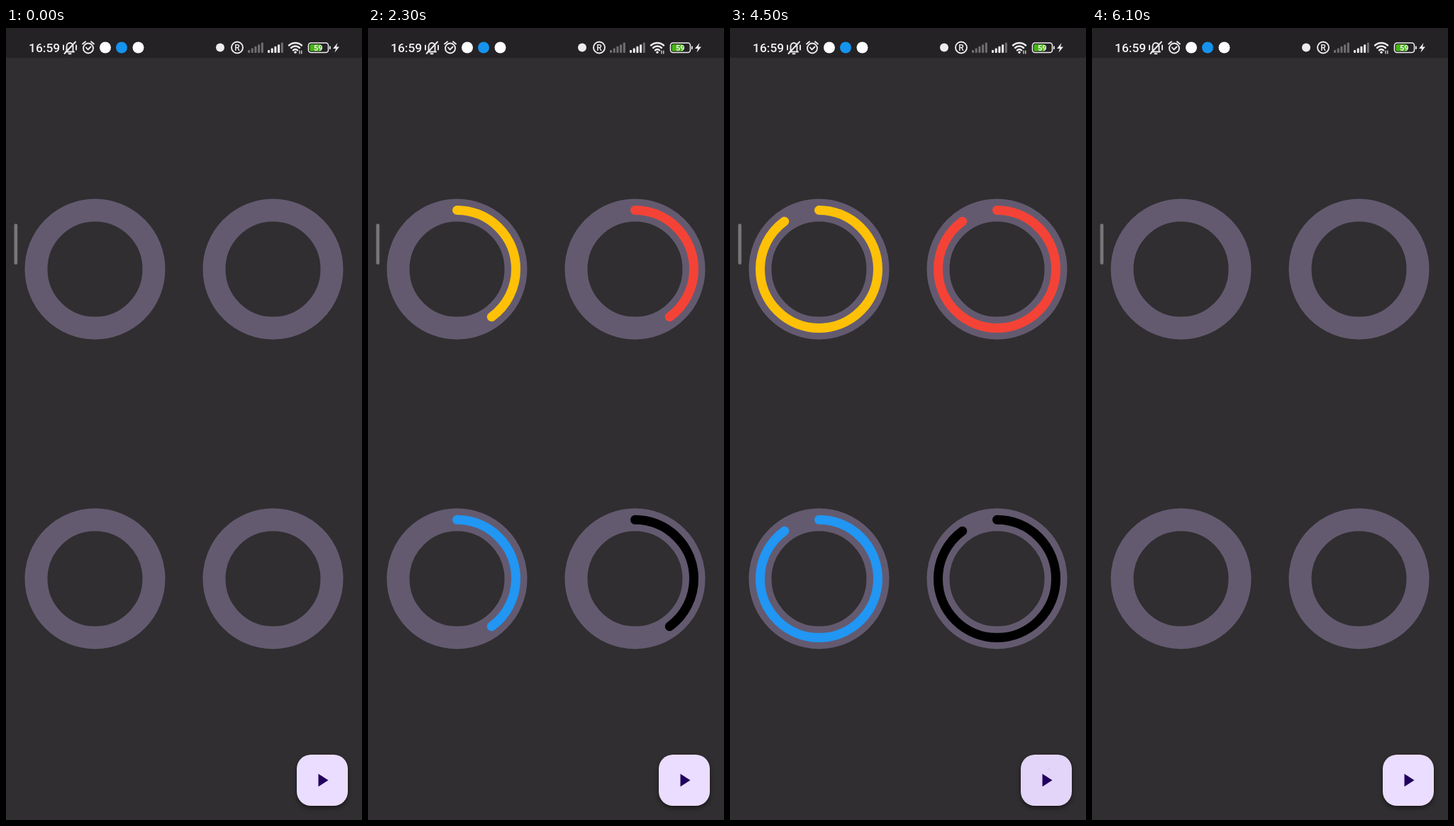
Write an HTML page that moves like this. It is 502 by 1115 pixels and loops after 6200 ms.

```html
<!DOCTYPE html>
<html lang="en">
<head>
<meta charset="utf-8">
<title>Progress rings</title>
<style>
  html, body { margin: 0; width: 100%; height: 100%; overflow: hidden; background: #302e30; }
  svg { display: block; width: 502px; height: 1115px; }
  text { font-family: Roboto, Inter, sans-serif; font-weight: 500; fill: #f3f2f3; }
  .line { fill: none; stroke: #eeedee; stroke-width: 1.9; stroke-linecap: round; stroke-linejoin: round; }
  .fab { filter: drop-shadow(0 3px 3px #0007); }
</style>
</head>
<body>
<svg viewBox="0 0 502 1115">
  <defs>
    <clipPath id="fabClip"><rect x="410" y="1023" width="72" height="72" rx="20"/></clipPath>
  </defs>
  <rect width="502" height="1115" fill="#302e30"/>
  <rect width="502" height="42" fill="#242225"/>

  <text x="32" y="34" font-size="17.4">16:59</text>
  <!-- muted bell -->
  <g class="line" stroke-width="1.6">
    <path d="M84 33.5H96M85.5 33V26a4.5 5 0 0 1 9 0V33M88.5 36.3h3M82.500 36L98 19.500M81 24.500v6M99 24.500v6"/>
  </g>
  <!-- alarm -->
  <g class="line">
    <circle cx="116" cy="28.500" r="7"/>
    <path d="M108 22.500l4-3.300M124 22.500l-4-3.300M113 27.500l2.500 3 4-4"/>
  </g>
  <circle cx="140" cy="27.500" r="8" fill="#fff"/>
  <circle cx="163" cy="27.500" r="8" fill="#1593ed"/>
  <circle cx="186.500" cy="27.500" r="8" fill="#fff"/>

  <circle cx="302" cy="27.500" r="6" fill="#eeedee"/>
  <circle class="line" cx="326" cy="27.500" r="8"/>
  <text x="326" y="31.900" font-size="12" text-anchor="middle">R</text>
  <g id="bars"></g>
  <!-- wifi -->
  <g class="line" style="stroke-width:2.500">
    <path d="M399 24.500a13 13 0 0 1 18 0M402 28a8.700 8.700 0 0 1 12 0M405 31.300a4.300 4.300 0 0 1 6 0"/>
  </g>
  <circle cx="408" cy="34.300" r="1.700" fill="#eeedee"/>
  <path class="line" style="stroke-width:1.200" d="M414 32v4M416.800 32v4"/>
  <!-- battery -->
  <rect class="line" style="stroke-width:1.600" x="426.500" y="21" width="28" height="13.500" rx="3.500"/>
  <rect x="428.500" y="23" width="15.500" height="9.500" rx="1.500" fill="#45b510"/>
  <rect x="456" y="25.500" width="1.800" height="4.500" rx=".8" fill="#eeedee"/>
  <text x="440.300" y="32" font-size="11" text-anchor="middle" style="font-weight:700">59</text>
  <path d="M467.500 21l-6.500 8h4l-1.500 5.500 6.500-8h-4z" fill="#eeedee"/>

  <rect x="11.500" y="275.500" width="4.700" height="57.500" rx="2.350" fill="#787678"/>
  <g id="rings" fill="none"></g>

  <rect class="fab" x="410" y="1023" width="72" height="72" rx="20" fill="#eaddff"/>
  <g id="ripples" clip-path="url(#fabClip)" fill="#21005d"></g>
  <path d="M440.500 1050v18l14-9z" fill="#21005d"/>
</svg>
<script>
const LOOP = 6200, STEP = 100, RESET = 5050;
const PRESS_DELAY = 90, FILL_TIME = 300;
const taps = [150, 600, 1050, 1750, 2300, 2890, 3315, 3687, 4090, 4492];
const clamp = v => Math.max(0, Math.min(1, v));

function add(parent, tag, attrs) {
  const el = document.createElementNS('http://www.w3.org/2000/svg', tag);
  for (const key in attrs) el.setAttribute(key, attrs[key]);
  return document.getElementById(parent).appendChild(el);
}

// Two signal meters: the first empty, the second with four bars lit
[[341, 0], [369, 4]].forEach(([x, lit]) => {
  for (let i = 0; i < 5; i++) {
    const height = 4 + i * 2.6;
    add('bars', 'rect', { x: x + i * 4.7, y: 35 - height, width: 3, height, rx: 1,
      fill: i < lit ? '#eeedee' : '#706e70' });
  }
});

const arcs = ['#ffc107', '#f44336', '#2196f3', '#000'].map((color, i) => {
  const cx = 125.5 + i % 2 * 251, cy = i < 2 ? 339.5 : 775.3;
  add('rings', 'circle', { cx, cy, r: 83, stroke: '#635a70', 'stroke-width': 32 });
  return add('rings', 'circle', { cx, cy, r: 83, stroke: color, 'stroke-width': 13,
    'stroke-linecap': 'round', pathLength: 100, transform: `rotate(-90 ${cx} ${cy})` });
});

const ripples = taps.map((_, i) =>
  add('ripples', 'circle', { cx: i === 7 ? 442.5 : 450, cy: 1043 }));

function draw(t) {
  const progress = t < RESET
    ? taps.reduce((sum, tap) => sum + 10 * clamp((t - tap - PRESS_DELAY) / FILL_TIME), 0)
    : 0;
  arcs.forEach(arc => {
    arc.setAttribute('stroke-dasharray', `${progress} 200`);
    arc.setAttribute('visibility', progress > 0 ? 'visible' : 'hidden');
  });
  ripples.forEach((ripple, i) => {
    const age = t - taps[i];
    ripple.setAttribute('r', Math.max(0, Math.min(105, age * 0.23)));
    ripple.setAttribute('opacity', 0.1 * clamp(age / 20) * clamp((500 - age) / 250));
  });
}

function tick() {
  const t = performance.now() % LOOP;
  draw(Math.floor(t / STEP) * STEP);
  requestAnimationFrame(tick);
}
tick();
</script>
</body>
</html>
```
